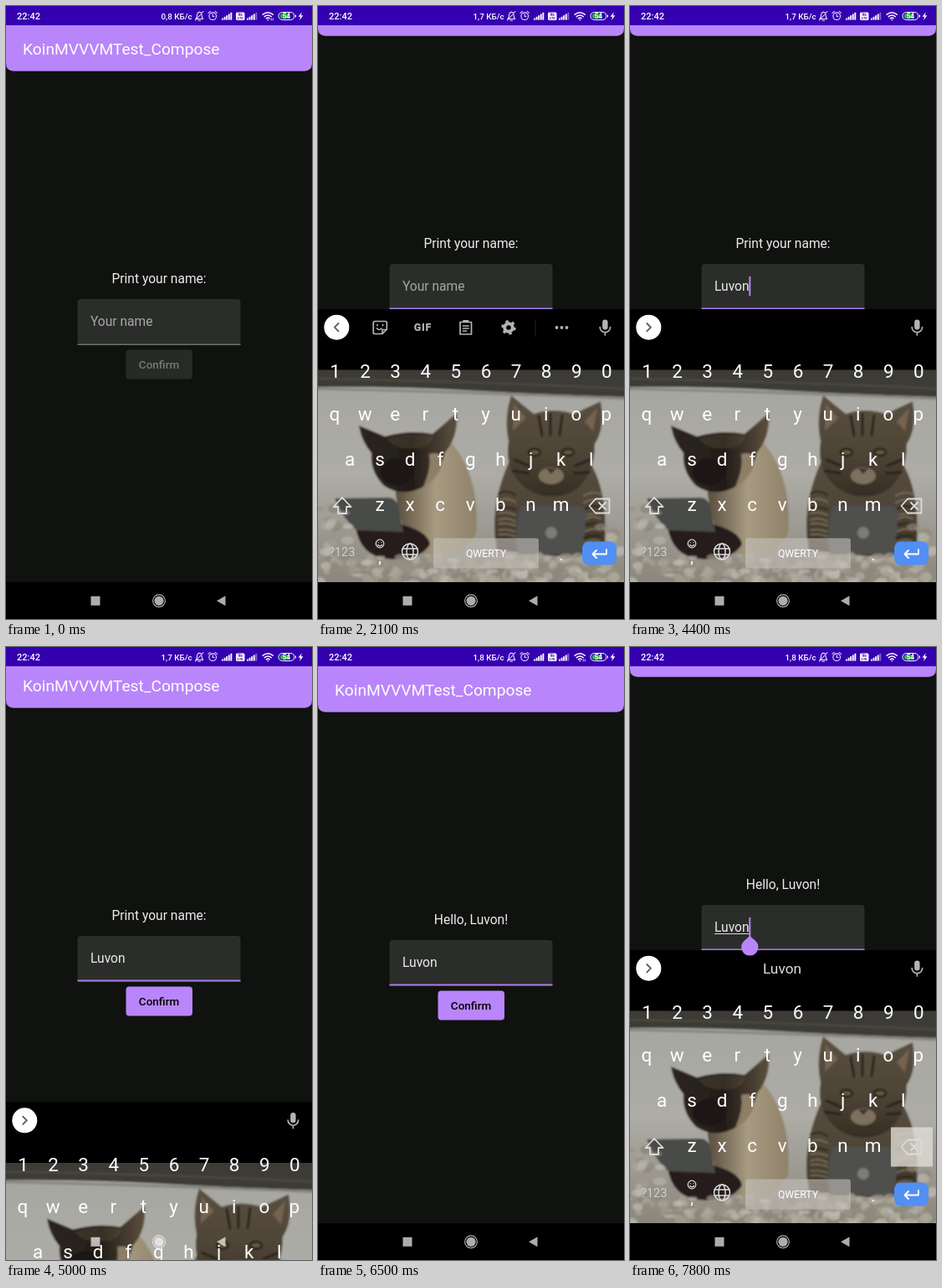
An HTML page for the animation above (8000 ms loop, 366 px wide and 732 px high).

```html
<!DOCTYPE html>
<html lang="en">
<head>
<meta charset="utf-8">
<title>Name form</title>
<style>
  html, body { margin: 0; width: 100%; height: 100%; overflow: hidden; background: #000; }
  svg { display: block; width: 100vw; height: 100vh; font-family: Roboto, "Noto Sans", sans-serif; }
  .body { font-size: 15.6px; fill: #ececec; }
  .mid { text-anchor: middle; }
  .line { fill: none; stroke-linecap: round; stroke-linejoin: round; }
</style>
</head>
<body>
<svg viewBox="0 0 366 732" preserveAspectRatio="none">
  <defs>
    <linearGradient id="blanket" x1="0" y1="0" x2="0" y2="1">
      <stop offset="0" stop-color="#a5a5a0"/><stop offset=".5" stop-color="#adaca6"/><stop offset="1" stop-color="#89857a"/>
    </linearGradient>
    <linearGradient id="cream" x1="0" y1="0" x2="1" y2="0">
      <stop offset="0" stop-color="#564a3b"/><stop offset=".5" stop-color="#a89b82"/><stop offset="1" stop-color="#8f8169"/>
    </linearGradient>
    <linearGradient id="mask" x1="0" y1="0" x2="1" y2="0">
      <stop offset="0" stop-color="#2d2620"/><stop offset=".55" stop-color="#231d18"/><stop offset="1" stop-color="#5e503f"/>
    </linearGradient>
    <linearGradient id="tabby" x1="0" y1="0" x2="0" y2="1">
      <stop offset="0" stop-color="#5b5142"/><stop offset=".6" stop-color="#4d4335"/><stop offset="1" stop-color="#352d24"/>
    </linearGradient>
    <filter id="soft" x="-5%" y="-5%" width="110%" height="110%"><feGaussianBlur stdDeviation="1"/></filter>
    <clipPath id="photoBox"><rect y="434.5" width="366" height="253.5"/></clipPath>
  </defs>

  <rect width="366" height="732"/>

  <g id="app">
    <rect width="366" height="688" fill="#10120f"/>
    <path d="M0 20H366V68.5Q366 77.7 357 77.7H9Q0 77.7 0 68.5Z" fill="#b985fa"/>
    <text x="20" y="58" font-size="19.2" fill="#fff">KoinMVVVMTest_Compose</text>
    <text id="greeting" class="body mid" x="183" y="331"></text>
    <path d="M85.5 404.5V354Q85.5 350 89.5 350H276.5Q280.5 350 280.5 354V404.5Z" fill="#2b2d2b"/>
    <rect id="rule" x="85.5" width="195"/>
    <text id="entry" class="body" x="101" y="382"></text>
    <rect id="compose" x="101" y="384" height="1" fill="#d8d8d8"/>
    <rect id="button" x="143.5" y="410.5" width="79.5" height="35" rx="4"/>
    <text id="confirm" class="mid" x="183" y="433.4" font-size="13.5" font-weight="500">Confirm</text>
    <rect id="cursor" y="365" width="2" height="23" fill="#b985fa"/>
  </g>

  <g id="status">
    <rect width="366" height="23" fill="#3500b0"/>
    <g fill="#fff" font-weight="500">
      <text x="13" y="16" font-size="11">22:42</text>
      <text id="speed" x="185.5" y="15.8" font-size="9.8"></text>
    </g>
    <g class="line" stroke="#e9e2fa" stroke-width="1.1">
      <path d="M227 15.5Q228.5 14 228.5 10.5Q229 7.5 231.3 7.3Q234 7.5 234 10.5Q234 14 235.7 15.5ZM230 17.2H232.5M236 6.5L226.5 17"/>
      <circle cx="247.2" cy="12.2" r="4.3"/>
      <path d="M247.2 9.7V12.5H249M242 8.3L244.3 6.3M252.4 8.3L250.1 6.3"/>
    </g>
    <g id="bars" fill="#fff"></g>
    <rect x="275" y="7.5" width="10.5" height="9.5" rx="1.5" fill="#fff"/>
    <text class="mid" x="280.2" y="12" font-size="4.5" font-weight="700" fill="#3500b0">Vo</text>
    <text class="mid" x="280.2" y="16.1" font-size="4.2" font-weight="700" fill="#3500b0">LTE</text>
    <g class="line" stroke="#fff" stroke-width="1.5">
      <path d="M307.2 10.2Q313.2 5.2 319.2 10.2M309.2 12.6Q313.2 9.4 317.2 12.6M311.3 14.8Q313.2 13.4 315.1 14.8"/>
      <path d="M313.2 16.6V16.7"/>
    </g>
    <path id="traffic" d="M317.3 17.3V14.5M319.3 14.5V17.3" stroke="#d9ccf5" stroke-width="1"/>
    <rect x="326" y="7.5" width="19" height="9" rx="4.5" fill="#3500b0" stroke="#fff"/>
    <rect x="328" y="9" width="11.5" height="6" rx="3" fill="#32b44a"/>
    <rect x="346" y="10.5" width="1" height="3" fill="#fff"/>
    <text class="mid" x="335.5" y="14.9" font-size="8.2" font-weight="500" fill="#fff">54</text>
    <path d="M353.8 7.2L349.6 12.8H352.2L351.2 16.9L355.4 11.2H352.8Z" fill="#fff"/>
  </g>

  <g id="keyboard">
    <rect y="362" width="366" height="380"/>
    <g clip-path="url(#photoBox)">
      <g filter="url(#soft)">
        <rect x="-5" y="425" width="376" height="270" fill="url(#blanket)"/>
        <path d="M-5 425H371V467Q270 464 180 459T-5 455Z" fill="#3c3b34"/>
        <path d="M-5 445Q180 448 371 457" fill="none" stroke="#4a4941" stroke-width="2.5"/>
        <path d="M-5 457Q180 461 371 469" fill="none" stroke="#85847d" stroke-width="3"/>
        <!-- left cat -->
        <path d="M92 540Q125 500 162 524Q194 565 189 630Q168 668 118 652Q88 610 92 540Z" fill="url(#cream)"/>
        <path d="M49 501L80 514Q110 506 137 511L166 486Q168 515 152 533Q147 556 128 573Q102 588 79 573Q62 556 64 534Q52 520 49 501Z" fill="url(#mask)"/>
        <path d="M82 517Q110 507 138 514Q134 530 112 528Q92 530 82 517Z" fill="#65574550"/>
        <path d="M133 535Q152 530 147 552Q140 568 126 574Q136 552 133 535Z" fill="#8d7e66"/>
        <ellipse cx="95" cy="556" rx="20" ry="16" fill="#1a1613"/>
        <path d="M45 622Q70 607 92 617Q132 626 134 643Q120 664 82 660Q50 656 45 622Z" fill="#251f1a"/>
        <path d="M20 588L85 587Q94 588 96 598L102 628L46 626Q28 610 20 588Z" fill="#4a4b4a"/>
        <!-- right cat -->
        <path d="M228 545Q275 505 322 540Q351 580 341 662L214 650Q204 600 228 545Z" fill="url(#tabby)"/>
        <path d="M231 465L258 487Q280 479 306 487L338 472Q344 503 331 523Q331 560 308 578Q279 594 250 577Q222 556 228 520Q222 492 231 465Z" fill="url(#tabby)"/>
        <path d="M234 475L249 492L233 507ZM334 480L319 496L329 508Z" fill="#74634f"/>
        <g id="stripes" class="line" stroke-width="2"></g>
        <g class="line" stroke="#29231b" stroke-width="3">
          <path d="M264 490L268 513M278 487V512M292 489L289 512M235 542L252 549M233 555L252 558M325 542L308 549M324 557L307 558"/>
        </g>
        <ellipse cx="279" cy="561" rx="15" ry="10" fill="#7d715d"/>
        <path d="M273 552H285L279 559Z" fill="#43312a"/>
        <g fill="#5f5c40" stroke="#211b15" stroke-width="2.5">
          <ellipse cx="259" cy="533" rx="7" ry="4"/><ellipse cx="299" cy="533" rx="7" ry="4"/>
        </g>
        <path d="M243 597H314Q321 599 321 608L316 655H239Q234 617 243 597Z" fill="#504f4d"/>
        <circle cx="279" cy="629" r="7" fill="#7c7b79"/>
        <g id="fluff"></g>
      </g>
    </g>

    <rect id="press" y="573" height="47" fill="#e2dfd7" opacity=".78"/>
    <g id="keys" class="mid" font-size="22.5" fill="#fff"></g>
    <g class="line" stroke="#dcdcda" stroke-width="1.8">
      <path id="shift" d="M29 587L18.5 598H24V606H34V598H39.5Z"/>
      <path d="M324.5 597L332 588.5H348.5V605.5H332ZM336 593L344 601M344 593L336 601"/>
    </g>
    <text x="13" y="657" font-size="14.5" fill="#d0d0ce">?123</text>
    <g class="line" stroke="#dededc" stroke-width="1.2">
      <circle cx="74" cy="642" r="4.8"/>
      <path d="M72.2 640.6V640.8M75.8 640.6V640.8M71.5 643.5Q74 646 76.5 643.5"/>
      <g stroke-width="1.5">
        <circle cx="110" cy="651.5" r="9.5"/><ellipse cx="110" cy="651.5" rx="4" ry="9.5"/>
        <path d="M101.3 648H118.7M101.3 655H118.7"/>
      </g>
    </g>
    <g class="mid" fill="#fff" font-size="19">
      <text x="74" y="665">,</text><text x="291" y="662">.</text>
    </g>
    <rect x="138" y="635.5" width="126" height="36" rx="3" fill="#c5c2bb" opacity=".6"/>
    <text class="mid" x="201" y="658" font-size="12.3" fill="#fff">QWERTY</text>
    <rect x="316" y="639.5" width="41" height="28" rx="8" fill="#518ff3"/>
    <path class="line" d="M345 649V654.5H329M333 650L328.5 654.5L333 659" stroke="#fff" stroke-width="1.8"/>

    <circle cx="22.3" cy="383.7" r="15" fill="#fff"/>
    <path id="chevron" class="line" stroke="#5b5b5b" stroke-width="1.8"/>
    <rect x="340.2" y="374.5" width="6.4" height="12" rx="3.2" fill="#b4b4b4"/>
    <path class="line" d="M337.2 383.5A6.2 6.2 0 0 0 349.6 383.5M343.4 390V393" stroke="#b4b4b4" stroke-width="1.7"/>
    <g id="tools">
      <g class="line" stroke="#b4b4b4" stroke-width="1.7">
        <path d="M68 376.5H80.5Q82.3 376.5 82.3 378.5V386L77 391.5H68Q66.2 391.5 66.2 389.5V378.5Q66.2 376.5 68 376.5ZM77 391.5V386.5H82.3M71 380.5V381.5M77.5 380.5V381.5M70.5 385Q73 388 76 385"/>
        <path d="M170 377.5H183.5V392H170ZM174 377.5V375.8H179.5V377.5M173.5 382H180M173.5 385H180M173.5 388H177.5"/>
        <circle cx="228" cy="384" r="4.8" stroke-width="4"/>
        <circle cx="228" cy="384" r="7.4" stroke-width="2.6" stroke-dasharray="3.4 4.35" style="stroke-linecap:butt"/>
      </g>
      <text class="mid" x="125.5" y="388.4" font-size="12.5" font-weight="800" letter-spacing=".8" fill="#b4b4b4">GIF</text>
      <path d="M260 374V395" stroke="#222"/>
      <g fill="#b4b4b4"><circle cx="285.5" cy="384" r="1.9"/><circle cx="291.5" cy="384" r="1.9"/><circle cx="297.5" cy="384" r="1.9"/></g>
    </g>
    <path id="dividers" d="M132 373V395M232.5 373V395" stroke="#222"/>
    <g id="hints" class="mid" font-size="17.3" fill="#dcdcda">
      <text x="87" y="390"></text><text x="182" y="390"></text><text x="277" y="390"></text>
    </g>
  </g>

  <path id="handle" d="M0 387L7.2 393.2A10.2 10.2 0 1 1 -7.2 393.2Z" fill="#b985fa"/>

  <g fill="#fff" opacity=".68">
    <rect x="101.5" y="704.8" width="11" height="11"/>
    <circle cx="183" cy="710.3" r="5.6"/>
    <circle cx="183" cy="710.3" r="7.4" fill="none" stroke="#fff" stroke-width="1.2"/>
    <path d="M252 710.3L262.5 704.3V716.3Z"/>
  </g>
</svg>

<script>
const LOOP = 8000, PAN = 42, NAME = "Luvon";
const $ = id => document.getElementById(id);
const clamp = x => Math.max(0, Math.min(1, x));
const easeOut = x => 1 - (1 - clamp(x)) ** 3;
const smooth = x => (x = clamp(x), x * x * (3 - 2 * x));
const within = (t, spans) => spans.some(([a, b]) => t >= a && t < b);
const latest = (t, steps) => steps.filter(s => t >= s[0]).pop()[1];
const show = (id, on) => $(id).setAttribute("visibility", on ? "inherit" : "hidden");
const set = (id, attrs) => { for (const k in attrs) $(id).setAttribute(k, attrs[k]); };
const add = (id, markup) => $(id).insertAdjacentHTML("beforeend", markup);

const typed = [[0, ""], [2500, "L"], [2750, "Lu"], [3350, "Luv"], [3500, "Luvo"], [4200, NAME]];
const hints = [
  [0, []], [2600, ["L", "Let", "Look"]], [2850, ["Lu", "Luck", "Lunch"]],
  [3400, ["Luv", "Love", "Live"]], [3600, ["Luvo", NAME, "Love"]], [4300, []], [7200, ["", NAME, ""]]
];
const speeds = [[0, "0,8"], [1900, "1,7"], [5800, "1,8"]];
const cursorOn = [[1600, 2100], [2500, 3250], [3400, 4000], [4200, 4700],
  [5500, 5900], [6300, 6500], [6900, 7400], [7600, 8000]];
const presses = [[2200, 2300, "shift"], [2450, 2550, "l"], [2700, 2800, "u"],
  [3310, 3400, "v"], [3460, 3560, "o"], [7700, 8000, "back"]];

// Keys: row text, first x, baseline
const spots = { shift: [29, 597, 50], back: [337, 597, 50] };
const letters = [];
for (const [row, x0, y] of [["1234567890", 20.5, 444], ["qwertyuiop", 20, 494.5],
  ["asdfghjkl", 38, 548.5], ["zxcvbnm", 74, 603]]) {
  [...row].forEach((ch, i) => {
    const x = x0 + 36.1 * i;
    add("keys", `<text x="${x}" y="${y}">${ch}</text>`);
    letters.push([$("keys").lastChild, ch]);
    spots[ch] = [x, y - 6.5, 34];
  });
}

for (const x of [258, 288]) {
  for (let i = 0; i < 5; i++) {
    const h = 2 + 1.7 * i, faint = x > 270 && i > 3;
    add("bars", `<rect x="${x + i * 2.6}" y="${16.6 - h}" width="1.9" height="${h}" opacity="${faint ? .4 : 1}"/>`);
  }
}

let seed = 7;
const rand = () => (seed = seed * 16807 % 2147483647) / 2147483647;

// Tabby coat: short curved marks down both flanks
for (let y = 582; y < 652; y += 7) {
  for (const [x, dir] of [[216, 1], [338, -1]]) {
    add("stripes", `<path d="M${x} ${y + rand() * 4}q${dir * 10} ${-6 * rand()} ${dir * 20} 2"
      stroke="${rand() < .5 ? "#2a231b" : "#766a56"}"/>`);
  }
}

// Woolly blanket edge in front of the cats
for (let i = 0; i < 260; i++) {
  const x = rand() * 366, edge = x < 45 ? 600 : x > 338 ? 620 : 657;
  const y = edge + rand() * (690 - edge);
  add("fluff", `<ellipse cx="${x}" cy="${y}" rx="${3 + rand() * 5}" ry="${2 + rand() * 4}"
    fill="hsl(44 9% ${48 + rand() * 26}%)" opacity=".7"/>`);
}

function panAt(t) {
  if (t < 4600) return PAN * easeOut((t - 1250) / 600);
  if (t < 6800) return PAN * (1 - easeOut((t - 4747) / 500));
  return PAN * easeOut((t - 6850) / 500);
}

// Keyboard drop in pixels, or null while hidden
function dropAt(t) {
  if (t >= 1600 && t < 5330) return t < 4600
    ? 4 * (1 - easeOut((t - 1600) / 250))
    : 370 * smooth((t - 4680) / 650);
  return t >= 7100 ? 12 * (1 - easeOut((t - 7100) / 250)) : null;
}

function draw(t) {
  const pan = panAt(t), drop = dropAt(t), text = latest(t, typed), focused = t >= 1300;

  set("app", { transform: `translate(0 ${-pan})` });
  $("greeting").textContent = t < 5800 ? "Print your name:" : `Hello, ${NAME}!`;
  $("entry").textContent = text || "Your name";
  $("entry").style.fill = text ? "#ececec" : "#a6a7a6";
  const width = text ? $("entry").getComputedTextLength() : 0;
  set("rule", focused ? { y: 402.5, height: 2, fill: "#ab7ee8" } : { y: 403.7, height: 1, fill: "#949594" });
  set("compose", { width });
  show("compose", within(t, [[2500, 4200], [7200, 8000]]));
  set("cursor", { x: 100.7 + width });
  show("cursor", within(t, cursorOn));
  set("button", { fill: text ? "#b985fa" : "#282a28" });
  set("confirm", { fill: text ? "#000" : "#777977" });

  $("speed").textContent = latest(t, speeds) + " КБ/с";
  show("traffic", within(t, [[0, 1900], [5800, 6700]]));

  show("keyboard", drop !== null);
  set("keyboard", { transform: `translate(0 ${drop || 0})` });
  const tools = t < 2600, words = latest(t, hints);
  show("tools", tools);
  set("chevron", { d: tools ? "M24.5 379L19.8 383.7L24.5 388.4" : "M20.2 379L24.9 383.7L20.2 388.4" });
  show("dividers", Boolean(words[0]));
  [...$("hints").children].forEach((el, i) => el.textContent = words[i] || "");

  const upper = within(t, [[2250, 2500]]);
  for (const [el, ch] of letters) el.textContent = upper ? ch.toUpperCase() : ch;
  set("shift", { fill: upper ? "#dcdcda" : "none" });
  const press = presses.find(([a, b]) => t >= a && t < b);
  show("press", Boolean(press));
  if (press) {
    const [x, y, w] = spots[press[2]];
    set("press", { x: x - w / 2, y: y - 23.5, width: w });
  }

  show("handle", t >= 6900);
  set("handle", { transform: `translate(${101.7 + width} ${-pan})` });
}

const start = performance.now();
function tick() {
  draw((performance.now() - start) % LOOP);
  requestAnimationFrame(tick);
}
tick();
</script>
</body>
</html>
```
